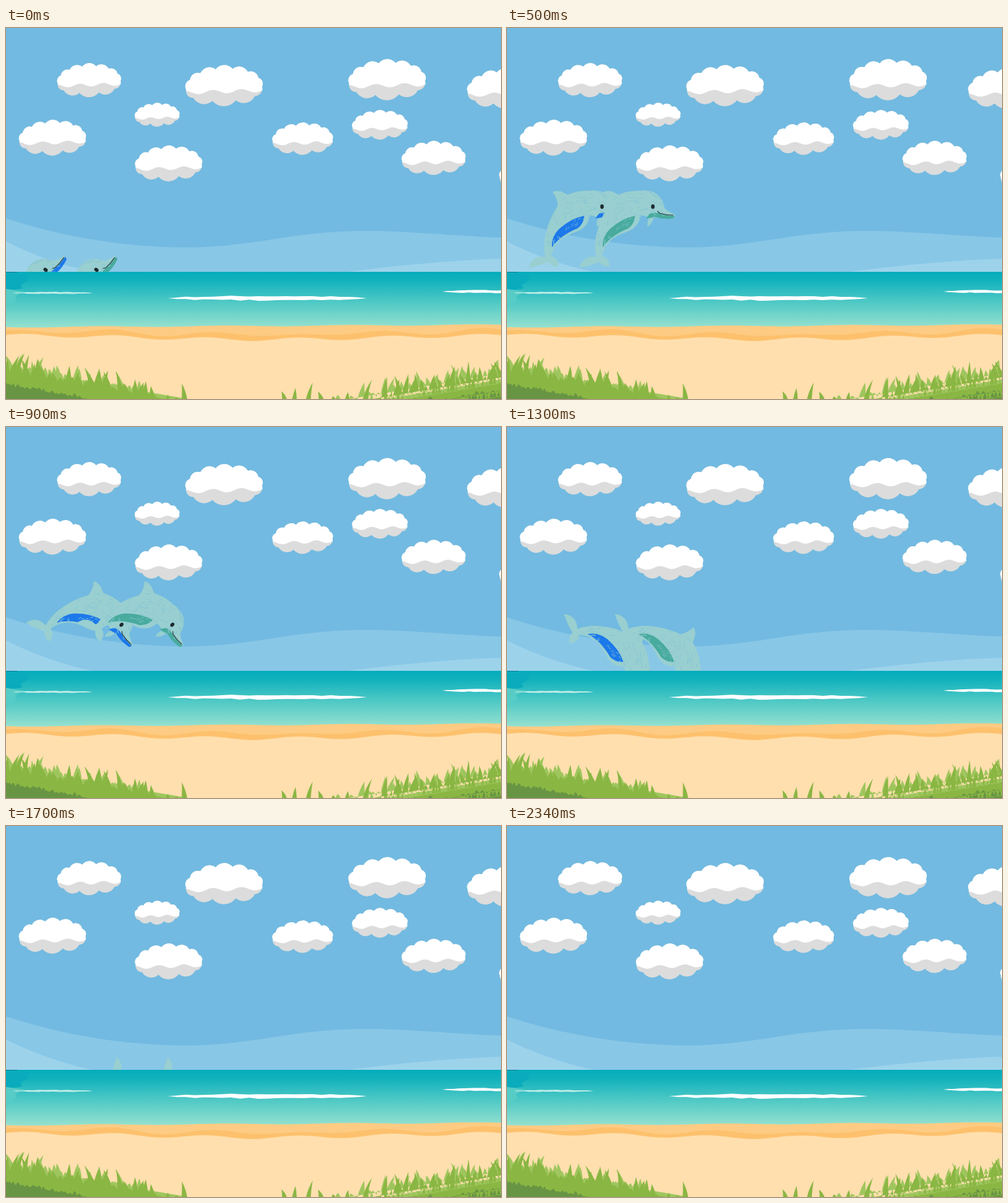
An HTML page for the animation above (2500 ms loop, 750 by 563 pixels).

```html
<!DOCTYPE html>
<html lang="en">
<head>
<meta charset="utf-8">
<title>Dolphins by the beach</title>
<style>
html, body { margin: 0; width: 100%; height: 100%; overflow: hidden; background: #72bae1 }
svg { display: block; width: 750px; height: 563px }
</style>
</head>
<body>
<svg viewBox="0 0 750 563">
<defs>
  <linearGradient id="water" x2="0" y2="1">
    <stop stop-color="#04adbb"/><stop offset=".15" stop-color="#12b2bd"/>
    <stop offset=".5" stop-color="#4dc8c5"/><stop offset="1" stop-color="#9fe4d0"/>
  </linearGradient>

  <path id="body" d="M33 364Q36 350 50 347L58 347Q54 330 59 311Q64 289 77 270Q76 257 69 249Q73 246 82 248L92 253Q107 246 125 247Q140 245 150 252Q160 260 162 274Q168 279 177 283L176 289Q164 291 149 287L145 289Q142 299 136 301Q135 293 138 287L126 284Q122 302 108 308Q94 313 84 319Q70 330 67 346Q79 349 78 362Q68 363 62 355Q54 360 33 364Z"/>
  <clipPath id="skin"><use href="#body"/></clipPath>
  <g id="dolphin" transform="translate(-144 -271)">
    <use href="#body" fill="#99cfd0"/>
    <path fill="currentColor" d="M68 333Q67 316 80 304Q97 289 117 285Q117 296 107 304Q80 315 68 333ZM134 289L139 282Q145 279 152 281Q163 285 177 285L175 289Q160 291 149 287Z"/>
    <path id="crayon" clip-path="url(#skin)" fill="none" stroke="#84c4d6" stroke-width=".8"/>
    <path fill="none" stroke="#26383c" stroke-width="1.1" d="M151 278L154 281Q164 284 175 284"/>
    <ellipse cx="144" cy="271" rx="2.7" ry="3.5" fill="#1d2b30"/>
  </g>
</defs>

<rect width="750" height="563" fill="#72bae1"/>
<path fill="#89c7e7" d="M0 289C90 318 180 333 280 333C385 331 430 309 540 308C620 308 680 316 750 318V375H0Z"/>
<path fill="#9cd3eb" d="M0 324Q63 356 135 371H0ZM510 371Q640 354 750 350V371Z"/>
<g id="clouds"></g>

<g id="pod">
  <use href="#dolphin" color="#1c79ea"/>
  <use href="#dolphin" color="#48ab9d"/>
</g>

<rect y="370" width="750" height="90" fill="url(#water)"/>
<path fill="#0aabbc" d="M0 373H35L33 383L22 390L25 395L14 397H0Z"/>
<path fill="#57cbc5" d="M0 396L28 400L14 407L16 413L0 426Z"/>
<path fill="#087c99" d="M0 370H17V371H0Z"/>
<g id="shore"></g>
<g id="grass"></g>
</svg>

<script>
const el = id => document.getElementById(id);
const { sin, cos, sqrt, hypot, PI } = Math;

let seed = 7;
const rand = (a, b) => {
  seed = seed * 16807 % 2147483647;
  return a + (b - a) * seed / 2147483647;
};
const range = (n, f) => Array.from({ length: n + 1 }, (_, i) => f(i / n));
const shape = (fill, d) => `<path fill="${fill}" d="${d}Z"/>`;

// Joins points with outward round bumps
const scallop = points => points.slice(1).map(([x, y], i) => {
  const r = .64 * hypot(x - points[i][0], y - points[i][1]);
  return `A${r} ${r} 0 0 1 ${x} ${y}`;
}).join('');

// White bumps over a half ellipse, grey bumps below, a wavy line between
function cloud([x, y, w]) {
  const h = w * .485;
  const across = u => x + w * (.5 - .475 * cos(PI * u));
  const top = range(7, u => [across(u), y + h * (.62 - .08 * u - .5 * sin(PI * u) ** .9)]);
  const under = range(5, u => [across(1 - u), y + h * (.54 + .08 * u + .34 * sin(PI * u) ** .7)]);
  const wave = range(24, u => `L${x + w * (.98 - .96 * u)} ${y + h * (.64 + .06 * u + .05 * sin(u * 17))}`);
  const start = 'M' + top[0] + scallop(top);
  return shape('#dcdcdc', start + scallop(under)) + shape('#fff', start + wave.join(''));
}

// left, top, width
el('clouds').innerHTML = [
  [76, 54, 100], [598, 172, 100], [523, 125, 87], [270, 57, 121], [517, 48, 121], [194, 114, 70],
  [402, 144, 95], [697, 62, 118], [18, 140, 105], [194, 179, 105], [746, 197, 100]
].map(cloud).join('');

// Foam line, thickest in the middle, with ragged edges
function foam(color, left, right, y, thick) {
  const edge = side => range(22, u =>
    `${left + (right - left) * (side > 0 ? 1 - u : u)} ${y + side * thick * sqrt(sin(PI * u)) * rand(.3, .6)}`);
  return shape(color, 'M' + [...edge(-1), ...edge(1)].join('L'));
}

const ground = (color, edge) =>
  shape(color, 'M0 563L' + range(150, u => `${u * 750} ${edge(u * 750)}`).join('L') + 'V563');
const dry = x => 469.5 + 2.5 * cos((x - 235) / 22) + 3 * sin((x - 200) / 120);

el('shore').innerHTML =
  foam('#c4eee9', 10, 131, 402, 3) + foam('#fff', 245, 547, 410, 7) + foam('#fff', 661, 840, 400, 5) +
  ground('#fdcb83', x => 454 - x * .005 + .8 * sin(x / 30)) +
  ground('#fdc16d', x => dry(x) - 7 + 2 * sin(x / 31)) +
  ground('#ffdfae', dry);

// A blade rises straight and bends towards its tip
const blade = (x, y, h, lean, w) =>
  `M${x - w} ${y + 9}Q${x - w * .7} ${y - h * .3} ${x + lean} ${y - h}Q${x + w} ${y - h * .3} ${x + w} ${y + 9}Z`;

// A slope of blades that falls from one side of the stage and thins out at its foot
function grass(color, side, dir, length, top, tall) {
  const foot = side + dir * (563 - top) / .17;
  let d = `M${side} ${top}L${foot} 563H${side}Z`;
  for (let s = 0; s < length; s += top + s * .17 > 560 ? rand(12, 32) : rand(4, 9)) {
    const h = tall * rand(.2, 1) ** 1.6;
    d += blade(side + dir * s, Math.min(563, top + s * .17), h, h * rand(-.45, .45), rand(4, 6));
  }
  return shape(color, d);
}

el('grass').innerHTML = [[0, 1, 280, 517], [750, -1, 335, 525]].map(([side, dir, length, top]) =>
  grass('#9fc65e', side, dir, length * .75, top - 1, 25) +
  grass('#8ab643', side, dir, length, top + 5, 33) +
  grass('#679543', side, dir, length * .42, top + 25, 6)).join('');

// Short crayon marks that follow the curve of the back
el('crayon').setAttribute('d', range(140, () => {
  const a = rand(2.7, 5.6), b = a + rand(.05, .15), r = rand(25, 70);
  const at = (angle, r) => `${125 + r * cos(angle)} ${316 + r * sin(angle)}`;
  return `M${at(a, r)}L${at(b, r + rand(-2, 2))}`;
}).join(''));

// Key poses of the leap: eye x, eye y, turn in degrees
const poses = [
  [60, 367, -57], [84, 306, -33], [144, 271, 0], [175, 300, 41],
  [194, 381, 82], [188, 494, 122], [189, 700, 160]
];
const pod = [...el('pod').children];

function draw() {
  const t = performance.now() % 2500;
  const [x, y, turn] = poses[Math.floor((t + 300) / 400)];
  pod.forEach((d, i) =>
    d.setAttribute('transform', `translate(${x + 77 * i} ${y}) rotate(${turn})`));
  requestAnimationFrame(draw);
}
draw();
</script>
</body>
</html>
```
